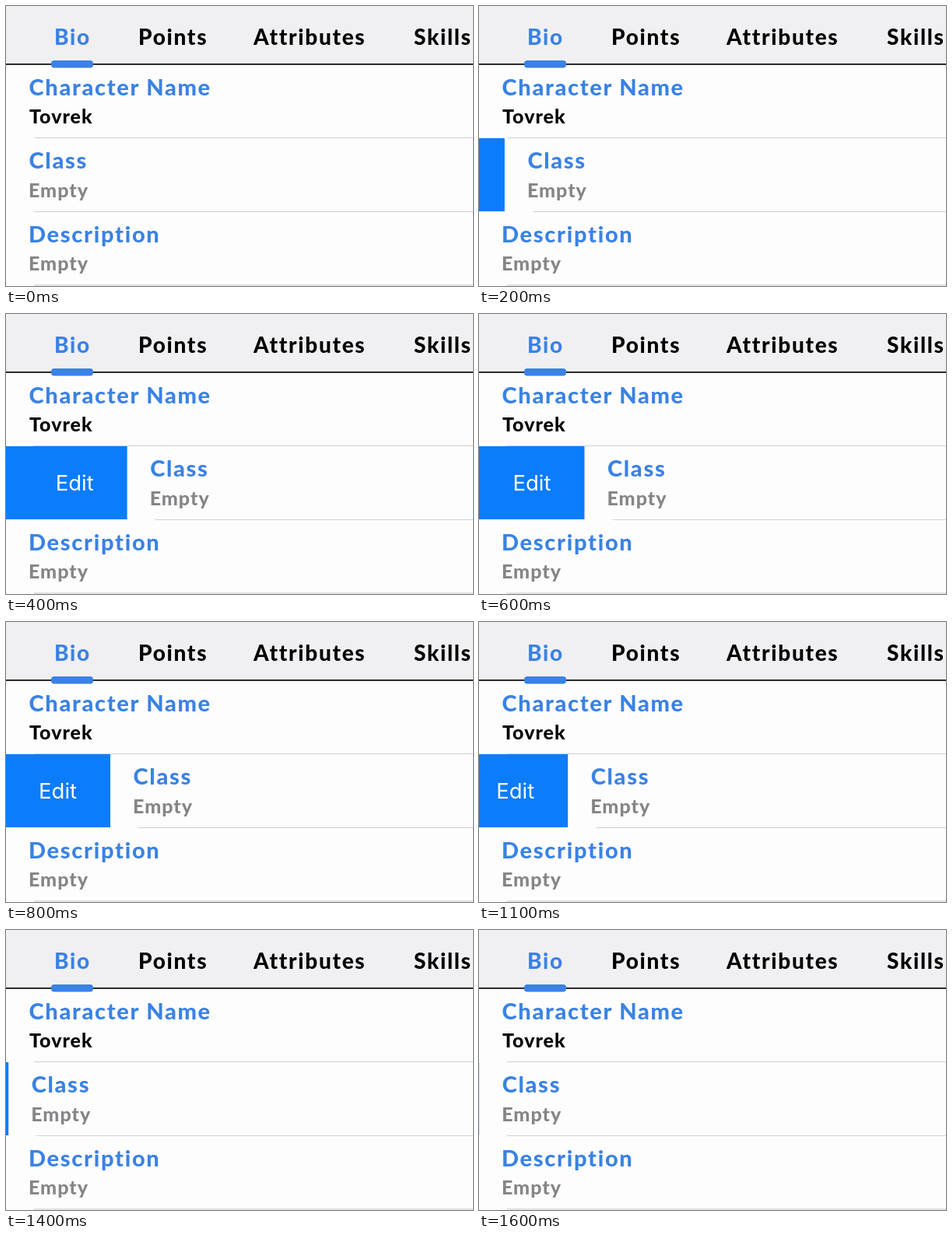
Write an HTML page that moves like this. It is 600 by 360 pixels and loops after 1700 ms.

```html
<!DOCTYPE html>
<html lang="en">
<head>
<meta charset="utf-8">
<title>Swipe to edit</title>
<style>
  html, body { margin: 0; width: 100%; height: 100%; overflow: hidden; background: #fefdfe; }
  svg { display: block; width: 600px; height: 360px; }
  text { font: 800 28px Lato, sans-serif; letter-spacing: 1.7px; }
  .label { font-size: 29px; }
  .value { font-size: 25px; letter-spacing: 1px; }
  .empty { fill: #858588; }
  .blue { fill: #3a82e4; }
  .action { font: 400 27.5px Inter, sans-serif; letter-spacing: 0; fill: #fff; }
  .rule { stroke: #d0d0d3; stroke-width: 1.2; }
</style>
</head>
<body>
<svg viewBox="0 0 600 360">
  <rect width="600" height="74" fill="#f0eff2"/>
  <rect y="74" width="600" height="1.7" fill="#080808"/>
  <rect class="blue" x="58" y="70" width="54" height="9.5" rx="4"/>
  <text class="blue" x="62" y="50">Bio</text>
  <text x="170" y="50">Points</text>
  <text x="318" y="50">Attributes</text>
  <text x="524" y="50">Skills</text>

  <text class="label blue" x="29.5" y="115">Character Name</text>
  <text class="value" x="30" y="151">Tovrek</text>
  <path class="rule" d="M36 169.5H600"/>

  <g id="row">
    <rect x="-170" y="170" width="170" height="94" fill="#0b7cfa"/>
    <text class="action" x="-92" y="227">Edit</text>
    <text class="label blue" x="29.5" y="209">Class</text>
    <text class="value empty" x="29" y="246">Empty</text>
    <path class="rule" d="M36 264.5H600"/>
  </g>

  <text class="label blue" x="29" y="304">Description</text>
  <text class="value empty" x="29" y="340">Empty</text>
  <path class="rule" d="M36 358.8H600"/>
</svg>
<script>
  const LOOP = 1700, STEP = 100;
  const OPEN = 134, DRAGGED = 74;
  const RELEASE = 300, CLOSE = 1059;
  const row = document.getElementById('row');

  // Critically damped spring: distance from rest after t ms
  function spring(t, start, velocity, rate) {
    return (start + (velocity + rate * start) * t) * Math.exp(-rate * t);
  }

  // Drag, flick past the open position and settle, then spring shut
  function offsetAt(t) {
    if (t < RELEASE) return DRAGGED * (t / RELEASE) ** 2;
    if (t < CLOSE) return OPEN + spring(t - RELEASE, DRAGGED - OPEN, 3.4, 0.02);
    return spring(t - CLOSE, OPEN, 0, 0.0165);
  }

  function draw() {
    const t = Math.floor(performance.now() % LOOP / STEP) * STEP;
    row.setAttribute('transform', `translate(${offsetAt(t)} 0)`);
    requestAnimationFrame(draw);
  }
  draw();
</script>
</body>
</html>
```
